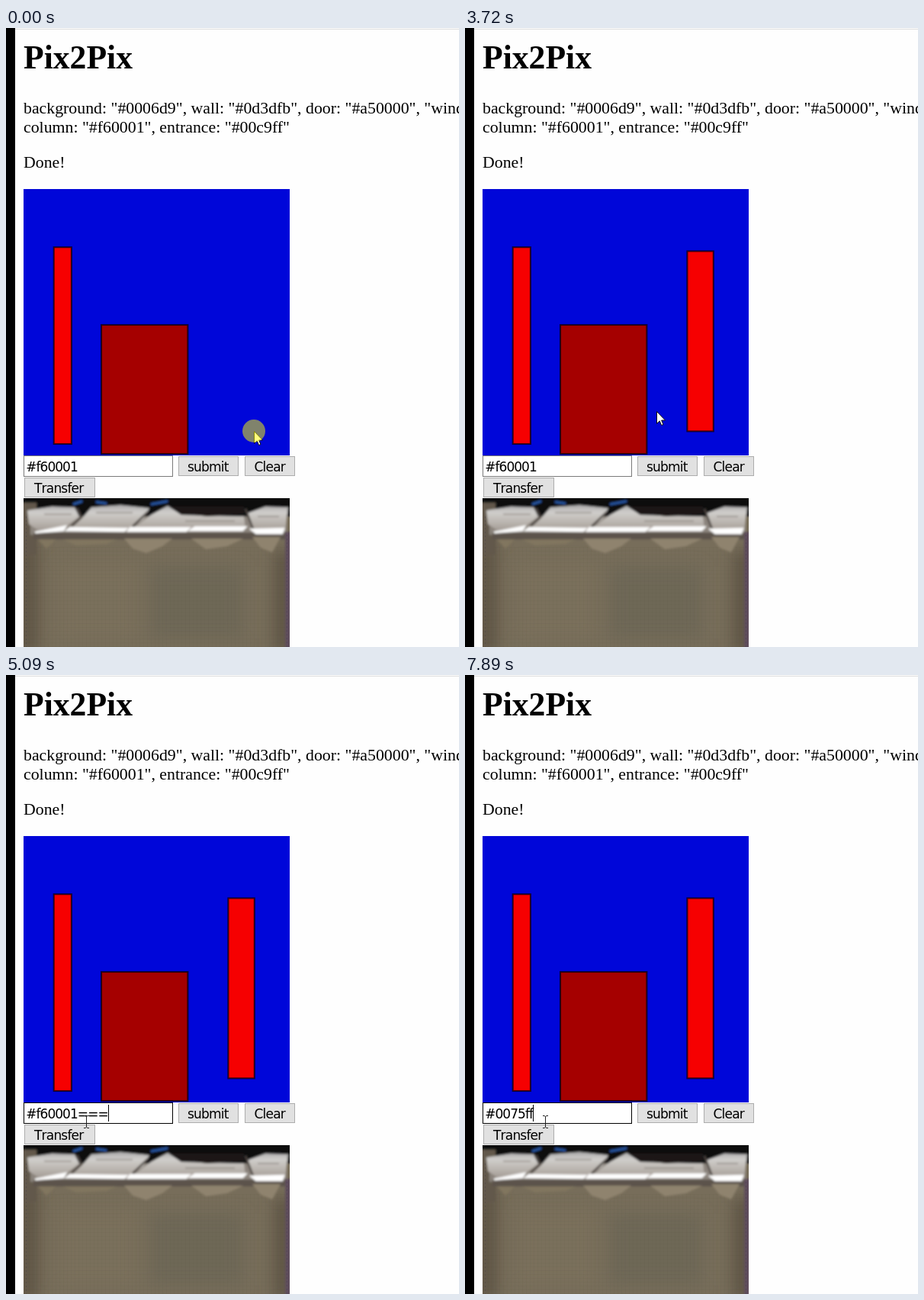
These frames come from a looping animation (594x811 px, 8000 ms). An HTML page:

```html
<!DOCTYPE html>
<html lang="en">
<head>
<meta charset="utf-8">
<title>Pix2Pix</title>
<style>
  html, body { margin: 0; width: 100%; height: 100%; overflow: hidden; background: #fefefe; }
  svg { display: block; }
  text { font: 21.82px "Liberation Serif", "Times New Roman", serif; white-space: pre; }
  .title { font-size: 43.64px; font-weight: bold; }
  .ui { font: 17px "DejaVu Sans", sans-serif; letter-spacing: -.8px; font-kerning: none; }
  #value { letter-spacing: -.95px; }
  .button { fill: #e1e1e1; stroke: #adadad; }
  .part { stroke: #0c000c; stroke-opacity: .75; stroke-width: 2.1; }
  .column { fill: #f60001; }
  #arrow { fill: #fff; stroke: #111; stroke-width: 1; }
  #beam { fill: none; stroke: #222; stroke-width: 1; }
</style>
</head>
<body>
<svg width="594" height="811" viewBox="0 0 594 811">
  <defs>
    <clipPath id="photo"><rect x="23" y="616" width="349" height="195"/></clipPath>
    <filter id="soft" x="-20%" y="-20%" width="140%" height="140%"><feGaussianBlur stdDeviation="1.7"/></filter>
    <filter id="haze" x="-30%" y="-30%" width="160%" height="160%"><feGaussianBlur stdDeviation="10"/></filter>
    <linearGradient id="stone" gradientUnits="userSpaceOnUse" x1="0" y1="625" x2="0" y2="658">
      <stop offset="0" stop-color="#aaa9aa"/>
      <stop offset=".3" stop-color="#d0cecb"/>
      <stop offset=".75" stop-color="#b6b0aa"/>
      <stop offset="1" stop-color="#a39c95"/>
    </linearGradient>
    <pattern id="weave" width="5" height="5" patternUnits="userSpaceOnUse">
      <path d="M0 .5H5M.5 0V5" stroke="#2c281f" stroke-opacity=".04"/>
    </pattern>
  </defs>

  <rect width="594" height="811" fill="#fefefe"/>
  <path d="M12 1.5H594" stroke="#dcdcdc"/>
  <rect width="12" height="811"/>

  <text class="title" x="23" y="53">Pix2Pix</text>
  <text x="23" y="112">background: "#0006d9", wall: "#0d3dfb", door: "#a50000", "window</text>
  <text x="23" y="137">column: "#f60001", entrance: "#00c9ff"</text>
  <text x="23" y="183">Done!</text>

  <rect x="23" y="211" width="349" height="349" fill="#0006d9"/>
  <rect class="part column" x="62.7" y="287.2" width="23.2" height="257.8"/>
  <rect class="part" x="125" y="389" width="113.4" height="169" fill="#a50000"/>
  <rect id="added" class="part column" x="291.4" y="292.4" width="34.4" height="236" visibility="hidden"/>

  <g clip-path="url(#photo)">
    <rect x="23" y="616" width="349" height="195" fill="#776d5a"/>
    <g filter="url(#haze)">
      <path d="M15 665H42V820H15ZM352 685H380V820H352Z" fill="#5f5545"/>
      <path d="M70 700H170V800H70Z" fill="#7a705c"/>
      <path d="M190 705H310V800H190Z" fill="#6e6757"/>
    </g>
    <rect x="23" y="680" width="349" height="131" fill="url(#weave)"/>
    <g filter="url(#soft)">
      <path d="M18 608H378V640H18Z" fill="#070810"/>
      <path d="M18 622H40V690H18Z" fill="#62594b"/>
      <path d="M32 640H368V664H32Z" fill="#8a837c"/>
      <path d="M36 661H366V670H36Z" fill="#5b524c"/>
      <g fill="url(#stone)">
        <path d="M28 632L60 627 90 628 96 640 78 654 42 658 30 650Z"/>
        <path d="M100 642L112 628 150 625 188 629 180 644 162 656H86Z"/>
        <path d="M190 638L212 626 230 638 312 640 314 656H166Z"/>
        <path d="M316 636L340 627 370 628 366 659H326Z"/>
      </g>
      <path d="M216 627H312V637L264 640 232 636Z" fill="#1c1614"/>
      <path d="M50 637H86M118 635H166M235 646H300M330 640H358" stroke="#8f8984" stroke-opacity=".7" stroke-width="2"/>
      <path d="M93 629L99 641 86 652M186 634L166 653M314 630L325 659" fill="none" stroke="#4a433e" stroke-width="2.5"/>
      <path d="M38 661L78 653 75 658ZM84 655L158 656 155 659 80 658ZM163 655H240L236 659H160ZM248 654H314L310 658H242ZM322 657L364 656 362 662H328Z" fill="#fff" stroke="#fff" stroke-width="2.5"/>
      <path d="M155 669H218L205 679 184 688 166 682ZM243 669H311L290 679 262 683ZM323 667H360L349 687 334 681Z" fill="#8f836e"/>
      <path d="M42 670H65L53 682ZM75 670H145L132 676 92 678Z" fill="#81765f"/>
      <path d="M88 624L100 620M118 621L132 623M190 624L212 620" stroke="#2a5fb4" stroke-width="2.5"/>
      <path d="M366 660H376V820H366Z" fill="#5e4e5c"/>
    </g>
    <path d="M26.5 640V811M368.5 664V811" stroke="#3f3848" stroke-opacity=".35" stroke-dasharray="2 3"/>
  </g>

  <rect id="field" x="23.5" y="560.5" width="195" height="27" fill="#fff"/>
  <text id="value" class="ui" x="26.2" y="581"></text>
  <rect id="caret" y="563" width="1" height="22"/>
  <rect class="button" x="226.5" y="561.5" width="78" height="25"/>
  <rect class="button" x="313.5" y="561.5" width="65" height="25"/>
  <rect class="button" x="24.5" y="589.5" width="92" height="25"/>
  <text class="ui" x="238" y="581">submit</text>
  <text class="ui" x="325.5" y="581">Clear</text>
  <text class="ui" x="37" y="609">Transfer</text>

  <path id="arrow" d="M.5 .5V16.3L4.2 12.8 6.6 18.5 9 17.5 6.6 12H11.5Z"/>
  <path id="beam" d="M-3 -7.5H-1L.5 -6.5 2 -7.5H4M.5 -6.5V7M-3 8.5H-1L.5 7.5 2 8.5H4"/>
  <circle id="click" r="15" fill="#ff0" fill-opacity=".5"/>
</svg>

<script>
const LOOP = 8000;
const TEXT_X = 26.2;

// [start ms, shape, x, y]
const pointer = [
  [0, "arrow", 325, 528], [690, "arrow", 362, 494], [770, "arrow", 452, 404],
  [850, "arrow", 540, 304], [920, "arrow", 579, 257], [1150, "none", 0, 0],
  [3720, "arrow", 251, 502], [3800, "arrow", 218, 520], [3870, "arrow", 162, 545],
  [3950, "beam", 118, 578], [4020, "beam", 105, 585]
];

// [start ms, text, caret shown]
const typing = [
  [0, "#f60001", false], [4480, "#f60001", true],
  [4860, "#f60001=", true], [4940, "#f60001==", false], [5010, "#f60001==", true], [5090, "#f60001===", true],
  [5320, "#f60001====", true], [5490, "#f60001===", false],
  [5950, "#f60001==", true], [6030, "#f60001", true], [6100, "#f600", true], [6180, "#f60", true],
  [6330, "#f6", true], [6560, "#f", false], [6640, "#f", true],
  [7040, "#", false], [7110, "#", true], [7580, "#", false], [7890, "#0075ff", true]
];

// [start ms, border colour]
const borders = [[0, "#7a7a7a"], [3950, "#171717"], [4400, "#000"]];

// [start ms, shown, x, y]
const clicks = [[0, true, 325, 528], [80, false, 0, 0], [4400, true, 104, 584], [4560, false, 0, 0]];

const $ = id => document.getElementById(id);
const [added, field, value, caret, arrow, beam, click] =
  ["added", "field", "value", "caret", "arrow", "beam", "click"].map($);

const current = (steps, t) => steps.findLast(step => step[0] <= t);
const show = (el, on) => el.setAttribute("visibility", on ? "visible" : "hidden");
const place = (el, x, y) => el.setAttribute("transform", `translate(${x} ${y})`);

function draw(t) {
  const [, shape, x, y] = current(pointer, t);
  const [, text, caretOn] = current(typing, t);
  const [, clicked, cx, cy] = current(clicks, t);

  for (const el of [arrow, beam]) {
    show(el, el.id === shape);
    place(el, x, y);
  }
  show(click, clicked);
  place(click, cx, cy);
  show(added, t >= 80);
  field.setAttribute("stroke", current(borders, t)[1]);

  if (value.textContent !== text) {
    value.textContent = text;
    caret.setAttribute("x", Math.round(TEXT_X + value.getComputedTextLength()));
  }
  show(caret, caretOn);
}

const start = performance.now();
function tick() {
  draw((performance.now() - start) % LOOP);
  requestAnimationFrame(tick);
}
tick();
</script>
</body>
</html>
```
